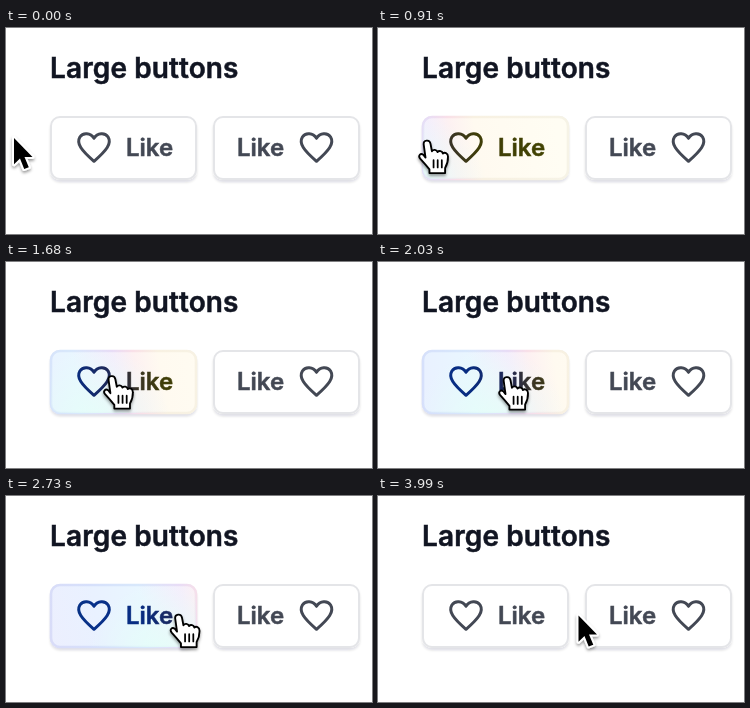
These frames come from a looping animation (366 px wide and 206 px high, 4.06 s). An HTML page:

```html
<!DOCTYPE html>
<html lang="en">
<head>
<meta charset="utf-8">
<title>Large buttons</title>
<style>
  html, body { margin: 0; width: 100%; height: 100%; overflow: hidden; background: #fff; }
  svg { display: block; width: 100vw; height: 100vh; }
  text { font-family: Inter, sans-serif; font-weight: 600; stroke-width: .5; }
  .title { font-size: 28px; letter-spacing: .12px; fill: #111522; stroke: #111522; }
  .label { font-size: 24px; }
  .face { stroke-width: 2; }
  .heart { fill: none; stroke-width: 3; stroke-linejoin: round; }
  .plain .face { fill: #fff; stroke: #e4e5e8; }
  .plain .label { fill: #434854; stroke: #434854; }
  .plain .heart { stroke: #434854; }
  .glow .face { fill: url(#tint); stroke: url(#edge); stroke-width: 2.6; }
  .glow .label { fill: url(#ink); stroke: url(#ink); }
  .glow .heart { stroke: url(#ink); }
</style>
</head>
<body>
<svg viewBox="0 0 366 206">
  <defs>
    <filter id="lift" x="-10%" y="-10%" width="120%" height="130%">
      <feDropShadow dx="0" dy="2.5" stdDeviation="1.3" flood-color="#101828" flood-opacity=".12"/>
    </filter>
    <filter id="drop" x="-40%" y="-30%" width="180%" height="170%">
      <feDropShadow dx="0" dy="2" stdDeviation="1.6" flood-opacity=".4"/>
    </filter>
    <radialGradient id="mint" gradientUnits="userSpaceOnUse" cx="-15" cy="160" r="75">
      <stop offset="0" stop-color="#e4fff8" stop-opacity=".9"/>
      <stop offset="1" stop-color="#e4fff8" stop-opacity="0"/>
    </radialGradient>
    <rect id="box" x="45" y="89" width="145" height="62" rx="9"/>
    <path id="heart" d="M88 110.3C84.5 104.8 77 104.3 73.9 109C70 115.5 75.5 122.5 88 133.3C100.5 122.5 106 115.5 102.1 109C99 104.3 91.5 104.8 88 110.3Z"/>
  </defs>

  <text class="title" x="44" y="49.6">Large buttons</text>

  <g class="plain">
    <g filter="url(#lift)">
      <use href="#box" class="face"/>
      <use href="#box" class="face" x="163"/>
    </g>
    <use href="#heart" class="heart"/>
    <use href="#heart" class="heart" x="222.5"/>
    <text class="label" x="120" y="128">Like</text>
    <text class="label" x="231" y="128">Like</text>
  </g>

  <g class="glow" id="glow" opacity="0">
    <use href="#box" class="face"/>
    <use href="#box" fill="url(#mint)"/>
    <use href="#heart" class="heart"/>
    <text class="label" x="120" y="128">Like</text>
  </g>

  <g id="cursor" filter="url(#drop)">
    <path id="arrow" d="M0 0V26.2L6 20.6L10.2 31L14.8 29.2L10.5 18.9H18.5Z"
      stroke="#fff" stroke-width="4" stroke-linejoin="round" paint-order="stroke"/>
    <g id="hand" transform="translate(.8 -.4) scale(1.03)" stroke="#000" stroke-width="1.8" stroke-linecap="round" stroke-linejoin="round">
      <path fill="#fff" d="M-2.2 17L-4 4.2C-4.5-.2 1.8-1 2.6 3.5L4 10.8C5.2 8.8 8.8 9 9.4 11.6C10.8 10 14 10.4 14.6 13C16.2 11.6 19.6 12.4 19.6 16C19.8 21 18.6 24 16.8 27V32H1.6V28.4C-1.5 24.6-4.5 21.2-7.4 18C-9.8 15-7 12.2-4.4 14.2Z"/>
      <path fill="none" stroke-width="1.7" d="M5.6 19.5V26.5M9.6 19.5V26.5M13.6 19.5V26.5"/>
    </g>
  </g>
</svg>

<script>
const LOOP = 4060, STEP = 70;
const $ = id => document.getElementById(id);

// Pointer path: time, x, y
const path = [
  [0, 8, 110], [280, 22, 109], [350, 22, 109], [700, 42, 112], [910, 49, 112.5],
  [1330, 83.5, 111.5], [1470, 92, 113.5], [2030, 129, 115], [2730, 172.5, 118.5],
  [2940, 187, 118], [3080, 194, 116], [3150, 196.5, 115], [3360, 200, 116.5],
  [3920, 200, 116.5], [3990, 200.5, 119.5], [LOOP, 200.5, 119.5]
];

// Iridescent bands by distance from the pointer
const bands = [-130, -80, -35, 5, 25, 50, 130];
const palettes = {
  tint: ['#eceffe', '#e9f1ff', '#e9f6ff', '#f5eefc', '#fdf1f2', '#fffaf0', '#fffdf3'],
  edge: ['#d9dcf8', '#d6e0fb', '#d8e8fb', '#e8dcf6', '#f9e0e8', '#f8f1e2', '#f6f3e6'],
  ink: ['#06347c', '#08308a', '#082c80', '#242850', '#3a3424', '#3f3d08', '#424400']
};

function makeNode(name, attrs, parent) {
  const node = document.createElementNS('http://www.w3.org/2000/svg', name);
  for (const key in attrs) node.setAttribute(key, attrs[key]);
  return parent.appendChild(node);
}

const gradients = Object.entries(palettes).map(([id, colors]) => {
  const box = { id, gradientUnits: 'userSpaceOnUse', x1: -130, y1: 140, x2: 130, y2: 100 };
  const gradient = makeNode('linearGradient', box, document.querySelector('defs'));
  colors.forEach((color, i) =>
    makeNode('stop', { offset: (bands[i] + 130) / 260, 'stop-color': color }, gradient));
  return gradient;
});
gradients.push($('mint'));

const clamp = v => Math.max(0, Math.min(1, v));

function pointer(t) {
  const i = path.findIndex(p => p[0] > t);
  const [t0, x0, y0] = path[i - 1], [t1, x1, y1] = path[i];
  const k = (t - t0) / (t1 - t0);
  return [x0 + (x1 - x0) * k, y0 + (y1 - y0) * k];
}

function render(time) {
  const t = Math.floor(time % LOOP / STEP) * STEP;
  const [x, y] = pointer(t);
  const over = x >= 44 && x <= 191;
  $('cursor').setAttribute('transform', `translate(${x} ${y})`);
  $('arrow').style.display = over ? 'none' : '';
  $('hand').style.display = over ? '' : 'none';
  $('glow').setAttribute('opacity', clamp((t - 735) / 140) * clamp((3150 - t) / 140));
  gradients.forEach(g => g.setAttribute('gradientTransform', `translate(${x})`));
}

const start = performance.now();
function tick() {
  render(performance.now() - start);
  requestAnimationFrame(tick);
}
render(0);
requestAnimationFrame(tick);
</script>
</body>
</html>
```
